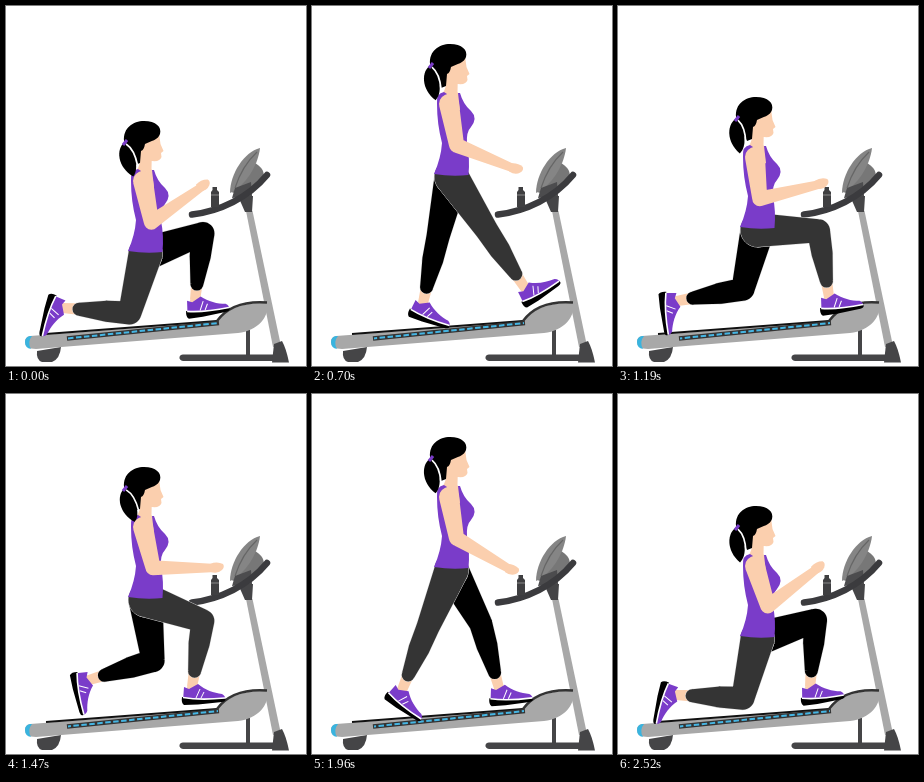
These frames come from a looping animation (300x360 px, 2590 ms). An HTML page with a canvas:

```html
<!DOCTYPE html>
<html lang="en">
<head>
<meta charset="utf-8">
<title>Lunges on a treadmill</title>
<style>
html, body { margin: 0; width: 100%; height: 100%; overflow: hidden; background: #fff; }
canvas { display: block; }
</style>
</head>
<body>
<canvas id="stage" width="300" height="360"></canvas>
<script>
const ctx = document.getElementById('stage').getContext('2d');
const LOOP = 2590, STEP = 70;
const SKIN = '#fbcfae', PURPLE = '#7a3cc9', DARK = '#454547', STEEL = '#a8a8a8';

// time, head top, hand x y, near ankle x y angle, far ankle x y angle
const KEYS = [
  [0,    115, 197, 180,  57, 302, 108, 189, 294,  -6],
  [280,   54, 199, 180,  79, 268,  81, 174, 291,  12],
  [530,   31, 203, 167, 178, 284,   6, 138, 295,  15],
  [700,   38, 203, 163, 213, 282, -30, 111, 297,  22],
  [950,   56, 202, 169, 222, 286, -13,  76, 295,  62],
  [1190,  91, 203, 178, 211, 291,  -6,  59, 295,  86],
  [1320, 104, 206, 177, 201, 292,  -4,  54, 297,  96],
  [1470,  73, 210, 174, 186, 293,   0,  83, 286,  80],
  [1760,  35, 204, 173, 128, 296,  16, 138, 277,  40],
  [1960,  43, 199, 176,  90, 296,  38, 187, 294,  -2],
  [2240,  65, 198, 174,  62, 297,  78, 221, 287, -13],
  [2520, 112, 200, 174,  58, 301, 106, 192, 293,  -5]
];

function key(i) {
  const n = KEYS.length, k = KEYS[(i + n) % n];
  return [k[0] + Math.floor(i / n) * LOOP, ...k.slice(1)];
}

// Periodic cubic interpolation through the keys
function pose(time) {
  const t = (time + LOOP) % LOOP;
  const i = KEYS.findLastIndex(k => k[0] <= t);
  const [a, b, c, d] = [key(i - 1), key(i), key(i + 1), key(i + 2)];
  const span = c[0] - b[0], s = (t - b[0]) / span;
  return b.map((p, j) => {
    const q = c[j];
    const m = (q - a[j]) / (c[0] - a[0]) * span;
    const n = (d[j] - p) / (d[0] - b[0]) * span;
    return p + s * (m + s * (3 * (q - p) - 2 * m - n + s * (2 * (p - q) + m + n)));
  });
}

function fill(path, color) {
  ctx.fillStyle = color;
  ctx.fill(new Path2D(path));
}

function stroke(path, color, width) {
  ctx.strokeStyle = color;
  ctx.lineWidth = width;
  ctx.stroke(new Path2D(path));
}

function at(x, y, angle, draw) {
  ctx.save();
  ctx.translate(x, y);
  ctx.rotate(angle);
  draw();
  ctx.restore();
}

const mix = (p, q, s) => [p[0] + (q[0] - p[0]) * s, p[1] + (q[1] - p[1]) * s];

// Joint of a two-part limb; side picks the bending direction
function joint(p, q, upper, lower, side) {
  const dx = q[0] - p[0], dy = q[1] - p[1], dist = Math.hypot(dx, dy);
  const along = (upper ** 2 - lower ** 2 + dist ** 2) / (2 * dist);
  const off = side * Math.sqrt(Math.max(0, upper ** 2 - along ** 2));
  return [p[0] + (dx * along + dy * off) / dist, p[1] + (dy * along - dx * off) / dist];
}

// Rounded limb through points [x, y] with the given radii
function limb(points, radii, color, edge) {
  const path = new Path2D();
  points.forEach(([x, y], i) => {
    path.moveTo(x + radii[i], y);
    path.arc(x, y, radii[i], 0, 7);
    if (!i) return;
    const [px, py] = points[i - 1], angle = Math.atan2(y - py, x - px);
    const nx = -Math.sin(angle), ny = Math.cos(angle), r = radii[i - 1], R = radii[i];
    path.moveTo(px - nx * r, py - ny * r);
    path.lineTo(x - nx * R, y - ny * R);
    path.lineTo(x + nx * R, y + ny * R);
    path.lineTo(px + nx * r, py + ny * r);
    path.closePath();
  });
  if (edge) {
    ctx.strokeStyle = '#ddd';
    ctx.lineWidth = 1;
    ctx.stroke(path);
  }
  ctx.fillStyle = color;
  ctx.fill(path);
}

function shoe() {
  fill('M-8 0 L-3 2 L6-3 C13 3 22 6 30 7 Q34 9 33 13 L-9 14 Z', PURPLE);
  fill('M-10 10 Q6 14 33 11 Q35 14 30 15 L6 17.5 L-8 18 Q-11 16 -10 10 Z', '#000');
  stroke('M-9 10.5 Q8 13.5 33 11', '#fff', 1.6);
  stroke('M8 2 L4 11 M12 5 L9 11', '#fff', 1);
}

function leg(hip, ankle, angle, color) {
  const knee = joint(hip, ankle, 61, 67, 1);
  const cuff = mix(knee, ankle, 0.76);
  limb([mix(knee, ankle, 0.68), ankle], [6, 5], SKIN);
  at(...ankle, angle * Math.PI / 180, shoe);
  limb([hip, knee, mix(knee, ankle, 0.35), cuff], [17, 11.5, 10.5, 6.5], color, true);
}

function treadmill(time) {
  fill('M31 345 L55 341 Q54 353 46 356 L36 356 Q30 354 31 345 Z', DARK);
  stroke('M242 324 V351', DARK, 4);
  fill('M177 348.5 H268 V355 H177 Q173 354 173.5 351 Q174 348.5 177 348.5 Z', DARK);
  fill('M240 205 L246.5 205 L275 340 L267 341 Z', STEEL);
  fill('M268 338 L276 335 Q280 342 283 356.5 H266 Z', DARK);
  fill('M24 330 L210 316 C222 301 240 296 261 297 C264 310 252 325 232 327 L30 343 Q19 343 19 336 Q19 331 24 330 Z', STEEL);
  fill('M24 330 Q19 331 19 336 Q19 342 25 343 Q21 336 26 330 Z', '#39b4df');
  stroke('M40 328 L211 315', '#111', 1.8);
  stroke('M211 315 C222 300 240 295 261 296.5', '#333', 2.4);
  stroke('M61 332.5 L213 317', '#333', 4.6);
  ctx.setLineDash([5.5, 2.5]);
  ctx.lineDashOffset = time / LOOP * 27 * 8;
  stroke('M62 332.4 L212 317.1', '#45b6e4', 2);
  ctx.setLineDash([]);
  fill('M247 156 Q261 163 257 174 L238 190 L225 186 Z', '#777');
  fill('M254 142 C238 146 224 168 224 187 C239 180 252 160 254 142 Z', '#858585');
  stroke('M251 146 Q236 160 229 182', '#666', 1.2);
  fill('M229 182 L245 176 L246 190 L226 192 Z', '#4c4c4e');
  fill('M232 190 H247 L246 206 H239 Z', DARK);
  ctx.lineCap = 'round';
  stroke('M186 208.5 C214 205 242 192 261 169', '#3b3b3e', 6.5);
  ctx.lineCap = 'butt';
  fill('M206.5 181 H211 V184 L213 186 V201 H205 V186 L206.5 184 Z', '#3f3f41');
  stroke('M205 189 H213', '#888', 1);
}

function torso() {
  fill('M134 24 H146 L145.5 48 Q150 57 154 64 L146 78 L128 70 L127 52 Q134 48 134 38 Z', SKIN);
  fill('M125 60 Q124 49 132 48 L135 50 Q128 58 138 70 L148 66 L146 49 L148 49 Q151 60 159 67 Q166 74 159 83 Q154 88 155 100 Q158 114 156.5 131 Q140 133 122 130 Q129 114 130 99 Q125 80 125 60 Z', PURPLE);
}

function head(sway) {
  fill('M133 17 L153 12 L154.5 23 L157.5 30 L155 32 L155.5 36 Q154 41 146 40 L133 40 Z', SKIN);
  fill('M118 20 C117 7 127 0 138 0 C150 0 156 6 154 13 C152 19 145 20 139 23 Q138 29 135 30 L134 42 L129 44 Q122 32 118 20 Z', '#000');
  at(119, 22, sway, () => {
    fill('M0 -1 C-10 5 -9 24 6 34 C13 26 9 9 1 0 Z', '#000');
    stroke('M1 1 Q9 7 11 23', '#fff', 1.7);
  });
  stroke('M117 24 L121 19', PURPLE, 3);
}

function arm(shoulder, hand) {
  const elbow = joint(shoulder, hand, 42, 63, -1);
  limb([shoulder, elbow, hand], [10, 7.5, 4], SKIN);
  const angle = Math.atan2(hand[1] - elbow[1], hand[0] - elbow[0]);
  at(...hand, angle * 0.7, () => fill('M-6 -4 Q1 -7 7 -4 Q9 -1 6 2 Q2 6 -5 4 Z', SKIN));
}

function draw(time) {
  const [, top, hx, hy, nx, ny, na, fx, fy, fa] = pose(time);
  const sway = (pose(time + 40)[1] - pose(time - 40)[1]) * 0.008;
  const hip = [139.5, top + 133];
  ctx.fillStyle = '#fff';
  ctx.fillRect(0, 0, 300, 360);
  treadmill(time);
  leg(hip, [fx, fy], fa, '#000');
  leg(hip, [nx, ny], na, '#343434');
  at(0, top, 0, () => {
    torso();
    head(sway);
  });
  arm([137, top + 60], [hx, hy]);
}

function tick() {
  const time = performance.now() % LOOP;
  draw(Math.floor(time / STEP) * STEP);
  requestAnimationFrame(tick);
}
tick();
</script>
</body>
</html>
```
